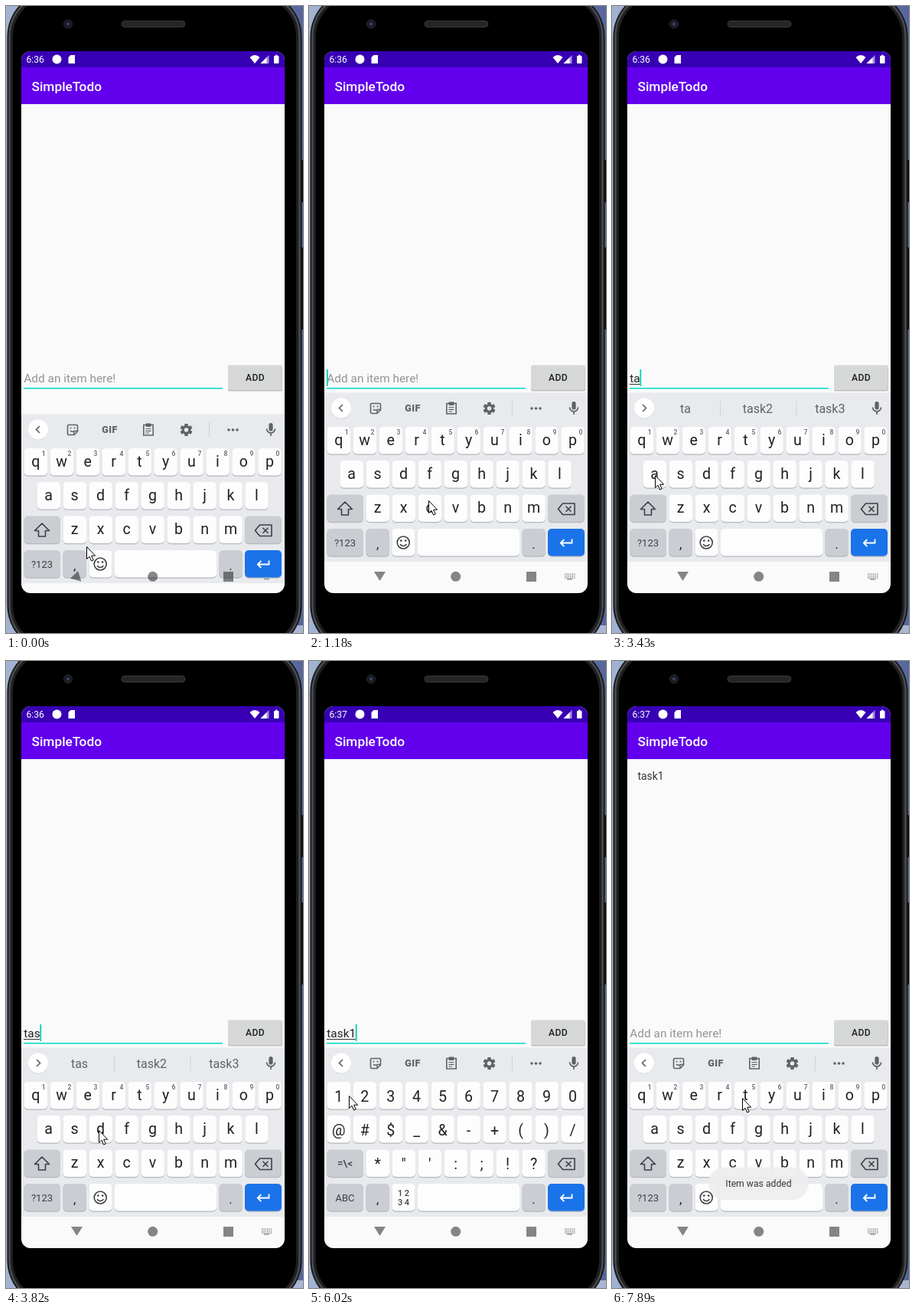
Write an HTML page that moves like this. It is 388 px wide and 818 px high and loops after 8 s.

```html
<!DOCTYPE html>
<html lang="en">
<head>
<meta charset="utf-8">
<title>Todo app</title>
<style>
html, body { margin: 0; width: 100%; height: 100%; overflow: hidden; background: #000; }
svg { display: block; width: 388px; height: 818px; font-family: Roboto, sans-serif; }
</style>
</head>
<body>
<svg id="stage" viewBox="0 0 388 818"></svg>
<script>
const LOOP = 8000, GREY = '#5f6368', DARK = '#cacdd2', INK = '#202124';
const stage = document.getElementById('stage');
const pen = document.createElement('canvas').getContext('2d');

// The screen refreshes in uneven steps: [first, last, count]
const STEPS = [[0, 0, 1], [120, 1060, 7], [1180, 1180, 1], [1770, 1770, 1], [2170, 3130, 9],
  [3280, 3820, 5], [3940, 4210, 3], [4360, 5050, 6], [5200, 5320, 2], [5470, 6020, 5],
  [6140, 6500, 3], [6650, 6650, 1], [6960, 7890, 8]]
  .flatMap(([a, b, n]) => Array.from({length: n}, (_, i) => a + (b - a) * i / Math.max(n - 1, 1)));

// Pointer path: time, x, y
const PATH = [[0, 105, 705], [1060, 156, 645], [2170, 156, 645], [2530, 177, 570], [2770, 177, 570],
  [2890, 175, 572], [3280, 56, 610], [3415, 56, 612], [3550, 87, 612], [3685, 89, 612],
  [3820, 121, 612], [4210, 289, 612], [4498, 290, 612], [5050, 55, 702], [5200, 54, 701],
  [5320, 52, 612], [5470, 50, 572], [6020, 52, 567], [6140, 85, 560], [6500, 341, 487],
  [6650, 340, 486], [7230, 340, 486], [7890, 170, 570], [LOOP, 170, 570]];

// Field content from a given time on
const EDITS = [[1170, ''], [2890, 't'], [3415, 'ta'], [3685, 'tas'], [4498, 'task'], [5745, 'task1'], [7090, '']];

// Key previews: start, end, label, key centre, key top
const PRESSES = [[2650, 2890, 't', 174.5, 549], [3280, 3415, 'a', 55.5, 593], [3550, 3685, 's', 89.5, 593],
  [4360, 4498, 'k', 293, 593], [5600, 5745, '1', 39, 549]];

const rect = (x, y, w, h, fill, r = 0, more = '') =>
  `<rect x="${x}" y="${y}" width="${w}" height="${h}" rx="${r}" fill="${fill}" ${more}/>`;
const circle = (x, y, r, fill, more = '') => `<circle cx="${x}" cy="${y}" r="${r}" fill="${fill}" ${more}/>`;
const path = (d, fill, more = '') => `<path d="${d}" fill="${fill}" ${more}/>`;
const line = (d, color = GREY, w = 1.5, more = '') =>
  path(d, 'none', `stroke="${color}" stroke-width="${w}" ${more}`);
const esc = s => s.replace(/&/g, '&amp;').replace(/</g, '&lt;');
const text = (s, x, y, size, fill = INK, anchor = 'middle', more = '') =>
  `<text x="${x}" y="${y}" font-size="${size}" fill="${fill}" text-anchor="${anchor}" ${more}>${esc(s)}</text>`;
const key = (x, y, w, fill = '#fdfdfd', h = 35.5) =>
  rect(x, y + 1.2, w, h, '#b4b8be', 5) + rect(x, y, w, h, fill, 5);

function pointer(t) {
  const i = Math.max(1, PATH.findIndex(p => p[0] > t));
  const [t0, x0, y0] = PATH[i - 1], [t1, x1, y1] = PATH[i];
  const k = (t - t0) / (t1 - t0);
  return [x0 + (x1 - x0) * k, y0 + (y1 - y0) * k];
}

const DEFS = '<defs><clipPath id="screen">' + rect(20, 59, 344, 707, '#fff', 12) + '</clipPath>' +
  '<linearGradient id="desk"><stop stop-color="#a3b4d2"/><stop offset="1" stop-color="#56669c"/></linearGradient></defs>';

function phone() {
  return rect(0, 0, 388, 818, 'url(#desk)') + rect(370, 808, 18, 10, '#a9b6d2') +
    rect(385, 201, 3, 55, '#0c0c0d') + rect(385, 315, 3, 107, '#0c0c0d') +
    rect(1.5, -20, 385, 862, '#151517', 60) +
    rect(4.5, -17, 379, 856, '#1f1f21', 57, 'stroke="#4b4c4f" stroke-width="2.5"') +
    rect(9, -12, 370, 846, '#000', 52) +
    rect(151, 19.5, 83, 8, '#262628', 4, 'stroke="#39393b"') +
    circle(81, 23.5, 5.5, '#17191f', 'stroke="#2a2c33"') + circle(81, 23.5, 2.3, '#34405f');
}

function appBar(t) {
  return rect(20, 59, 344, 707, '#fafafa') + rect(20, 59, 344, 21, '#3700b3') + rect(20, 80, 344, 48, '#6200ee') +
    text(t < 4600 ? '6:36' : '6:37', 26.5, 74, 12.1, '#fff', 'start') +
    circle(66.5, 69.5, 6, '#fff') + path('M84.5 64H90V75H81.5V67Z', '#fff') +
    path('M318.5 67Q325 61 331.5 67L325 75Z', '#fff') +
    path('M343.5 64V75H332.5Z', '#fff', 'fill-opacity=".55"') + path('M340.5 67V75H332.5Z', '#fff') +
    rect(350, 65, 6.5, 10, '#fff', 1) + rect(352, 63.7, 2.5, 2, '#fff') +
    text('SimpleTodo', 33.5, 111, 17.3, '#fff', 'start', 'font-weight="500"');
}

function form(t, value, editTime) {
  pen.font = '15.4px Roboto, sans-serif';
  const end = 23 + pen.measureText(value).width;
  const caretOn = (t - editTime + LOOP) % 1000 < 500;
  const pressed = t >= 6950 && t < 7220;
  return (t >= 7090 ? text('task1', 33.5, 155, 13.8, '#333', 'start') : '') +
    (value ? text(value, 23.3, 491, 15.4, INK, 'start') + rect(23, 493, end - 23, 1, '#333')
      : text('Add an item here!', 23.3, 491, 15.4, '#949494', 'start')) +
    rect(23, 498, 260, 1.5, '#03dac5') +
    (caretOn ? rect(value ? end : 23, 474, 1.8, 22, '#03cfbb') : '') +
    rect(290, 470, 71, 32.5, '#bcbdbe', 2) + rect(290, 468.5, 70.5, 32.5, pressed ? '#bdbec0' : '#d6d7d7', 2) +
    text('ADD', 325.5, 489, 12.1, INK, 'middle', 'font-weight="500" letter-spacing=".4"');
}

function toolbar(value, t) {
  const words = value && t < 5745;
  const divider = x => rect(x, 515, 1, 20, '#cfd2d6');
  let s = circle(42, 525.3, 13.2, '#d9dbde') + circle(42, 524.5, 13, '#fff') +
    line(words ? 'M40 520l4.5 4.5l-4.5 4.5' : 'M44 520l-4.5 4.5l4.5 4.5', GREY, 1.7) +
    rect(343.4, 516, 5.2, 10.5, GREY, 2.6) + line('M340.5 523.5a5.5 5.5 0 0 0 11 0M346 529V533', GREY, 1.7);
  if (words) {
    return s + divider(141) + divider(240.5) +
      [value, 'task2', 'task3'].map((w, i) => text(w, 96 + 94.4 * i, 531, 16, GREY)).join('');
  }
  const teeth = Array.from({length: 6}, (_, i) =>
    rect(233.3, 517, 4.4, 4, GREY, .6, `transform="rotate(${i * 60} 235.5 525)"`)).join('');
  return s + line('M81.5 518.5H92.5L93.5 519.5V527L89 531.5H81.5L80.5 530.5V519.5Z', GREY, 1.6, 'stroke-linejoin="round"') +
    line('M93 526.5H89V531M84 526a3.5 3.5 0 0 0 4 1') + circle(84.5, 522.5, 1, GREY) + circle(89.5, 522.5, 1, GREY) +
    text('GIF', 135.5, 528.8, 12.5, GREY, 'middle', 'font-weight="900" letter-spacing=".5"') +
    line('M179.8 518.5H192.2V532H179.8Z', GREY, 1.6) + rect(182.5, 516.5, 7, 4.5, GREY, 1) +
    line('M182.5 523.5h7M182.5 526.3h7M182.5 529h4.5', GREY, 1.2) +
    teeth + circle(235.5, 525, 4.3, 'none', `stroke="${GREY}" stroke-width="3.2"`) + divider(265) +
    [291, 296.5, 302].map(x => circle(x, 525, 1.8, GREY)).join('');
}

function keyboard(t, value) {
  const symbols = t >= 5200 && t < 7090;
  const rows = symbols ? ['1234567890', '@#$_&-+()/', `*"':;!?`] : ['qwertyuiop', 'asdfghjkl', 'zxcvbnm'];
  const tops = [549, 593, 637.5], bases = symbols ? [574.5, 618.5, 662.5] : [573, 617, 660.8];
  let s = rect(20, 504.5, 344, 220.5, '#e8eaed') + toolbar(value, t);
  rows.forEach((row, r) => {
    const left = r === 2 ? 74.5 : row.length === 9 ? 40.5 : 23.5;
    [...row].forEach((c, i) => {
      const x = left + i * 33.97;
      s += key(x, tops[r], 30.5) + text(c, x + 15.2, bases[r], 19.6);
      if (!r && !symbols) s += text(String((i + 1) % 10), x + 25.6, 559, 8.6, GREY, 'middle', 'font-weight="500"');
    });
  });
  s += key(23.5, 637.5, 47.5, DARK) + key(312, 637.5, 48, DARK) + key(23.5, 682, 47.5, DARK) +
    key(74.5, 682, 30.5, DARK) + key(108.5, 682, 30, '#fdfdfd') + key(142, 682, 133) +
    key(278.5, 682, 30.5, DARK) + key(312, 682, 48, '#1a73e8') +
    text(symbols ? 'ABC' : '?123', 47, 705, 13, '#3c4043') +
    text(',', 89.7, 708, 17) + text('.', 293.5, 708, 17) +
    line('M331.5 649H347V663.5H331.5L325.5 656.2Z', '#3c4043', 1.6, 'stroke-linejoin="round"') +
    line('M335.5 652.7l7 7M342.5 652.7l-7 7', '#3c4043', 1.6) +
    line('M343.5 695.5V700.5H329M333.3 696l-4.5 4.5l4.5 4.5', '#fff', 1.8);
  if (symbols) {
    s += text('=\\<', 47, 660, 13.5, '#3c4043', 'middle', 'font-weight="500"') +
      text('1 2', 123.5, 698, 11, '#3c4043', 'middle', 'font-weight="500"') +
      text('3 4', 123.5, 710, 11, '#3c4043', 'middle', 'font-weight="500"');
  } else {
    s += line('M47 647L37.5 656.5H42.5V664H51.5V656.5H56.5Z', '#3c4043', 1.6, 'stroke-linejoin="round"') +
      circle(123.2, 700, 8, 'none', 'stroke="#3c4043" stroke-width="1.6"') +
      circle(120.3, 697.5, 1.3, '#3c4043') + circle(126.1, 697.5, 1.3, '#3c4043') +
      line('M119.2 702a4.4 4.4 0 0 0 8 0', '#3c4043', 1.6);
  }
  const settle = t < 120 ? 1 : Math.max(0, 1 - t / 420) ** 3;
  return `<g transform="translate(0 ${28 * settle})">${s}</g>`;
}

function navBar(t) {
  const turn = t < 120 ? 195 : t < 280 ? 285 : 360;
  let dots = '';
  for (let y = 740.5; y < 746; y += 2.5)
    for (let x = 334; x < 347; x += 2.4) dots += rect(x, y, 1.4, 1.4, '#000');
  return `<g fill-opacity=".47">` + path('M85 738H100L92.5 750Z', '#000', `transform="rotate(${turn} 92.5 743.5)"`) +
    circle(191.7, 744.3, 6.5, '#000') + rect(284, 738, 13, 13, '#000', .5) +
    (t < 120 ? rect(337, 747, 7, 1.2, '#000') : dots + rect(337, 747.3, 7, 1.3, '#000')) + '</g>';
}

function preview([, , label, x, top]) {
  return rect(x - 17, top - 61, 34, 98, '#a9acb0', 4, 'fill-opacity=".6"') +
    rect(x - 16.7, top - 62, 33.2, 97.5, '#c7c9cc', 4) +
    text(label, x, top - 28, 24.5, '#111') + text('…', x + 8, top - 18, 10, '#333');
}

function toast(t) {
  const alpha = Math.min(1, Math.max(0, (t - 7560) / 300)) * .92;
  return alpha ? `<g opacity="${alpha}">` + rect(126, 660.5, 131, 42.5, '#eeeeef', 21) +
    text('Item was added', 191.5, 686, 12.2, '#2a2a2a') + '</g>' : '';
}

function scene(t) {
  const [editTime, value] = EDITS.filter(e => e[0] <= t).pop() || EDITS[0];
  const press = PRESSES.find(p => t >= p[0] && t < p[1]);
  const [x, y] = pointer(t);
  return DEFS + phone() +
    '<g clip-path="url(#screen)">' + appBar(t) + form(t, value, editTime) + keyboard(t, value) +
    navBar(t) + (press ? preview(press) : '') + toast(t) + '</g>' +
    path('M.5 .5V16.5L4 13.2L6.6 19L9.2 17.9L6.6 12.2H11.6Z', '#fff',
      `stroke="#000" transform="translate(${x} ${y})"`);
}

let shown = -1;
function tick(now) {
  const t = now % LOOP;
  const step = STEPS.filter(s => s <= t + .01).pop();
  if (step !== shown) stage.innerHTML = scene(shown = step);
  requestAnimationFrame(tick);
}
tick(0);
</script>
</body>
</html>
```
